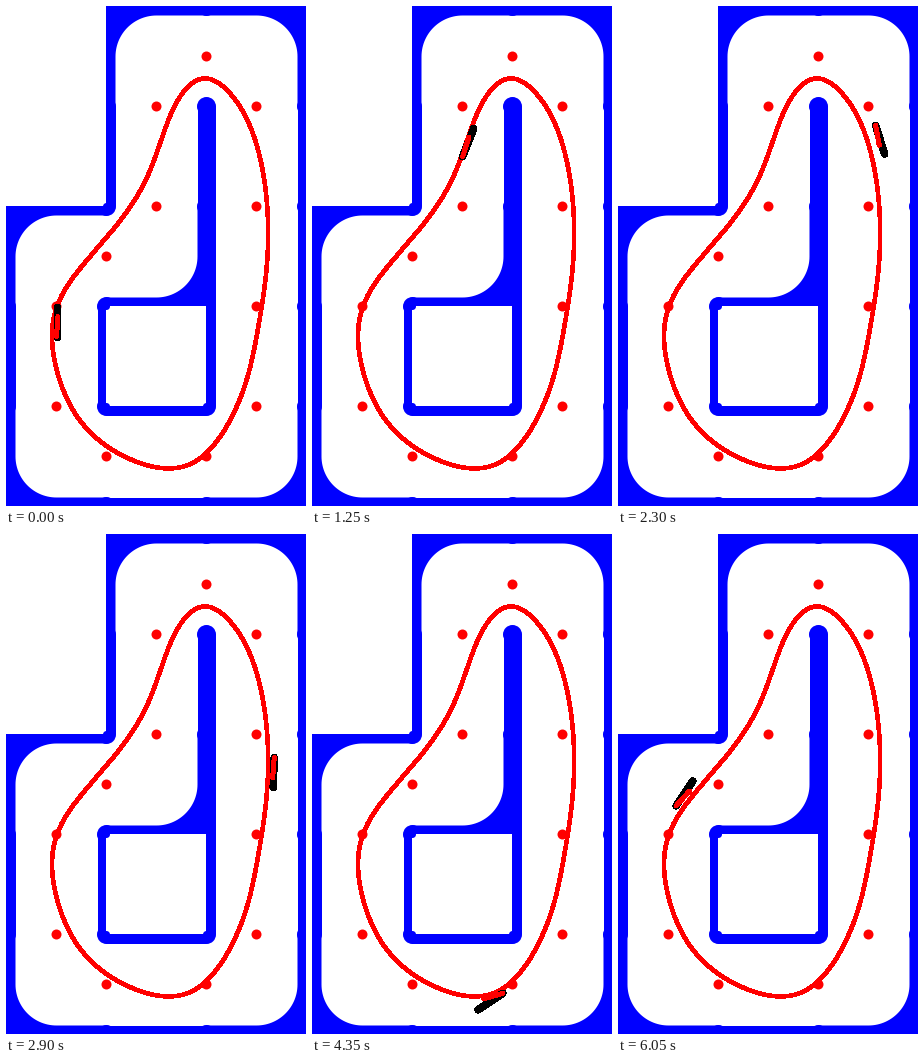
A matplotlib script for the animation above (6100 ms loop, 300 by 500 pixels).

```python
import numpy as np
import matplotlib.pyplot as plt
from matplotlib.animation import FuncAnimation
from matplotlib.patches import Circle, Polygon, Rectangle

W, H, DPI = 300, 500, 100
FRAMES, STEP_MS = 122, 50
PX = 72 / DPI  # points per pixel
BLUE, RED, WHITE, BLACK = "#0000ff", "#ff0000", "#ffffff", "#000000"

TILE, WALL = 100, 9
HALF = TILE / 2
DIRS = {"U": (0, -1), "R": (1, 0), "D": (0, 1), "L": (-1, 0)}
LAP = [np.array(DIRS[c]) for c in "URUURDDDDLLU"]
START_TILE = (0, 3)

# a few points on the racing line, joined by a closed cubic spline
ROUTE = [(200, 72), (238, 108), (258, 175), (261, 250), (251, 325),
         (232, 396), (185, 457), (118, 450), (68, 406), (46, 340),
         (58, 284), (100, 231), (140, 172), (166, 104)]

SPEED, BODY, BASE = 8.77, 30, 20  # pixels per tick, pixels, pixels
AHEAD, GAIN, MAX_STEER = 10, 0.011, np.radians(30)

fig = plt.figure(figsize=(W / DPI, H / DPI), dpi=DPI, facecolor=WHITE)
ax = fig.add_axes([0, 0, 1, 1])
ax.set_xlim(-0.5, W - 0.5)
ax.set_ylim(H - 0.5, -0.5)
ax.axis("off")


def disc(center, r, color, clip=None):
    patch = ax.add_patch(Circle(center, r, color=color, lw=0))
    if clip:
        patch.set_clip_path(clip)


def wall(points, clip):
    patch = ax.add_patch(Polygon(points, color=BLUE, lw=0))
    patch.set_clip_path(clip)


def stroke(width, color, **kw):
    return ax.plot([], [], color=color, lw=width * PX, aa=False,
                   solid_capstyle="round", solid_joinstyle="round", **kw)[0]


def draw_tile(cell, enter, leave):
    corner = cell * TILE
    mid = corner + HALF
    tile = ax.add_patch(Rectangle(corner - 0.5, TILE, TILE, color=WHITE,
                                  lw=0, aa=False))
    near, far = HALF - WALL, HALF + 1
    if (enter == leave).all():
        side = enter[::-1]
        for s in (-side, side):
            wall([mid + s * near - enter * far, mid + s * near + enter * far,
                  mid + s * far + enter * far, mid + s * far - enter * far],
                 tile)
    else:
        outer = enter - leave
        t = np.linspace(np.pi / 2, 0, 30)
        arc = near * np.column_stack([np.cos(t), np.sin(t)])
        shape = np.vstack([(-far, far), (-far, near), arc,
                           (near, -far), (far, -far), (far, far)])
        wall(mid + shape * outer, tile)
        disc(mid - HALF * outer, 3.5, BLUE)
    for dx in (-HALF, HALF):
        for dy in (-HALF, HALF):
            disc(mid + (dx, dy), WALL + 0.5, BLUE, tile)


def draw_track():
    cell = np.array(START_TILE)
    gates = []
    for enter, leave in zip(LAP[-1:] + LAP[:-1], LAP):
        draw_tile(cell, enter, leave)
        gates.append(cell * TILE + HALF + leave * HALF)
        cell = cell + leave
    for gate in gates:
        disc(gate, 5, RED)


def closed_spline(points, steps=40):
    p = np.array(points, float)
    eye = np.eye(len(p))
    system = 4 * eye + np.roll(eye, 1, 0) + np.roll(eye, -1, 0)
    m = np.linalg.solve(system, 3 * (np.roll(p, -1, 0) - np.roll(p, 1, 0)))
    q, n = np.roll(p, -1, 0), np.roll(m, -1, 0)
    u = np.linspace(0, 1, steps, endpoint=False)[None, :, None]
    p, q, m, n = (v[:, None, :] for v in (p, q, m, n))
    curve = ((2 * u**3 - 3 * u**2 + 1) * p + (u**3 - 2 * u**2 + u) * m
             + (3 * u**2 - 2 * u**3) * q + (u**3 - u**2) * n)
    return curve.reshape(-1, 2)


def unit(angle):
    return np.array([np.cos(angle), np.sin(angle)])


line = closed_spline(ROUTE)
tangent = np.roll(line, -1, 0) - np.roll(line, 1, 0)
course = np.arctan2(tangent[:, 1], tangent[:, 0])


def steer(pos, angle):
    """Turn towards the line's course, corrected by the sideways error."""
    probe = pos + AHEAD * unit(angle)
    i = np.argmin(((line - probe) ** 2).sum(1))
    error = (line[i] - probe) @ unit(course[i] + np.pi / 2)
    turn = np.angle(np.exp(1j * (course[i] - angle)))
    return np.clip(turn + np.arctan(GAIN * error), -MAX_STEER, MAX_STEER)


def drive(ticks, substeps=5):
    pos, angle = np.array([50.0, 330.0]), -np.pi / 2
    poses = []
    for _ in range(ticks):
        poses.append((pos, angle, steer(pos, angle)))
        for _ in range(substeps):
            d = SPEED / substeps
            turn = d / BASE * np.tan(steer(pos, angle))
            pos = pos + d * unit(angle + turn / 2)
            angle += turn
    return poses


draw_track()
stroke(3.6, RED).set_data(*np.vstack([line, line[:1]]).T)
body = stroke(6.5, BLACK, zorder=5)
wheel = stroke(4, RED, zorder=6)
poses = drive(FRAMES)


def update(frame):
    pos, angle, delta = poses[max(frame - 1, 0)]  # start pose held two ticks
    body.set_data(*np.array([pos, pos + BODY * unit(angle)]).T)
    wheel.set_data(*np.array([pos, pos + BASE * unit(angle + delta)]).T)
    return body, wheel


anim = FuncAnimation(fig, update, frames=FRAMES, interval=STEP_MS,
                     repeat=True, repeat_delay=0, blit=False)
plt.show()
```
